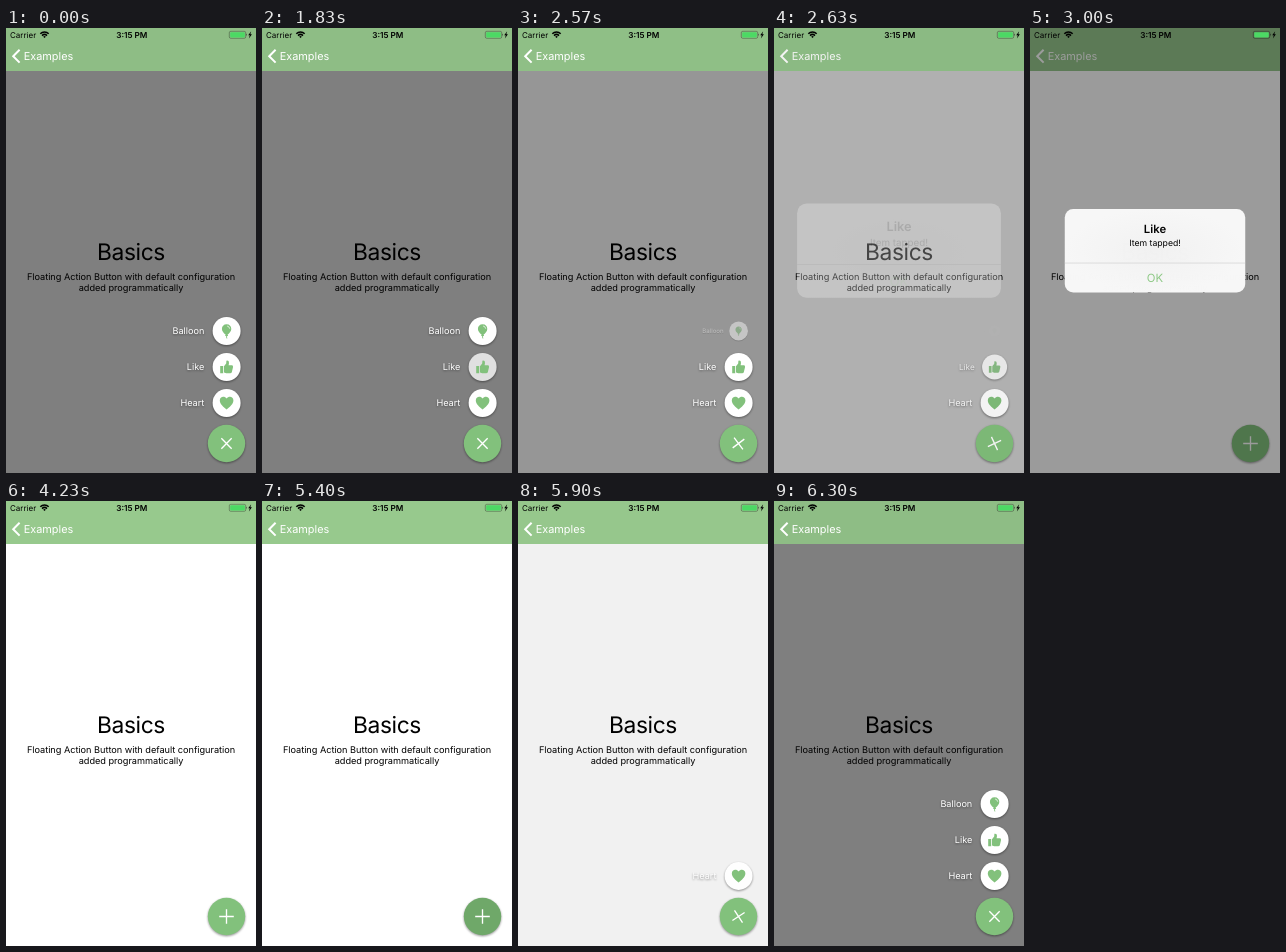
Write an HTML page that moves like this. It is 250x445 px and loops after 6330 ms.

```html
<!DOCTYPE html>
<html lang="en">
<head>
<meta charset="utf-8">
<title>Floating action button</title>
<style>
  html, body { margin: 0; width: 100%; height: 100%; overflow: hidden; background: #fff; }
  svg { display: block; width: 100%; height: 100%; }
  text { font-family: Inter, Roboto, sans-serif; text-rendering: geometricPrecision; }
  .middle { text-anchor: middle; }
  .raised { filter: drop-shadow(0 1px 1px rgba(0, 0, 0, .42)); }
  .label { font-size: 9.15px; fill: #fff; text-anchor: end; }
  .subtitle { font-size: 9.2px; letter-spacing: -.03px; }
  .icon { fill: #82c17c; }
</style>
</head>
<body>
<svg viewBox="0 0 250 445">
  <rect width="250" height="445" fill="#fff"/>
  <g class="middle">
    <text x="125" y="231.6" font-size="22.8" letter-spacing="-.4">Basics</text>
    <text class="subtitle" x="125" y="251.6">Floating Action Button with default configuration</text>
    <text class="subtitle" x="125" y="262.6">added programmatically</text>
  </g>
  <rect id="overlay" width="250" height="445"/>

  <rect width="250" height="43" fill="#97c98d"/>
  <rect id="navTint" width="250" height="43"/>
  <path d="M13.6 21.8 7.2 28.2l6.4 6.4" fill="none" stroke="#fff" stroke-width="2"/>
  <text x="17.7" y="32.2" font-size="10.9" fill="#fff">Examples</text>

  <g id="items"></g>
  <g class="raised" transform="translate(220.5 415.5)">
    <circle id="fab" r="18.7"/>
    <path id="plus" d="M-7.3 0H7.3M0-7.3V7.3" stroke="#fff" stroke-width="1.35"/>
  </g>

  <rect id="dim" width="250" height="445"/>
  <g id="alert" class="middle">
    <radialGradient id="frost">
      <stop offset="0" stop-color="#f3f3f3"/><stop offset="1" stop-color="#f9f9f9"/>
    </radialGradient>
    <g id="plate">
      <rect x="35" y="181" width="180" height="83.3" rx="8.5" fill="url(#frost)"/>
      <path id="okPress" d="M35 235H215V255.8a8.5 8.5 0 0 1-8.5 8.5H43.5a8.5 8.5 0 0 1-8.5-8.5Z" fill="#dedede"/>
      <rect x="35" y="234.7" width="180" height=".6" fill="#c9c9c9"/>
    </g>
    <g id="message">
      <text x="125" y="205.3" font-size="11.3" font-weight="600">Like</text>
      <text x="125" y="218.3" font-size="8.67">Item tapped!</text>
      <text x="125" y="253.8" font-size="11.33" fill="#8cc884">OK</text>
    </g>
  </g>

  <text x="4" y="9.8" font-size="8">Carrier</text>
  <g fill="none" stroke="#000" stroke-width="1.5">
    <path d="M34.3 5.7a6 6 0 0 1 8.4 0M36 7.6a3.6 3.6 0 0 1 5 0"/>
    <path d="M37.2 8.7a1.9 1.9 0 0 1 2.6 0L38.5 10Z" fill="#000" stroke="none"/>
  </g>
  <text class="middle" x="125.8" y="9.9" font-size="8.2" font-weight="600">3:15 PM</text>
  <rect x="223.3" y="3.3" width="16.4" height="7" rx="1.5" fill="none" stroke="#000" stroke-opacity=".5" stroke-width=".6"/>
  <rect x="224.2" y="4.2" width="14.6" height="5.2" rx=".8" fill="#4cd964"/>
  <path d="M240.4 5.6q1 1.2 0 2.4ZM245.2 3.2l-3 4h1.6l-.9 3.2 3-4.1h-1.6Z"/>
</svg>
<script>
const LOOP = 6330;
const CLOSE = { shown: 2570, start: 2491 };
const OPEN = { shown: 5870, start: 5840 };
const ALERT = { shown: 2590, gone: 3815, end: 4230 };

const ITEMS = [
  { name: 'Balloon', y: 303, icon: `<path d="M0-6.7C3-6.7 4.7-4.6 4.7-2 4.7.5 2.4 2.6 1 3.6L1.5 4.9H.5Q.2 6 .8 7.4H0Q-.7 6-.4 4.9H-1.5L-1 3.6C-2.4 2.6-4.7.5-4.7-2-4.7-4.6-3-6.7 0-6.7Z"/>
    <path d="M.5-5Q2.8-4.6 3.1-2.3" fill="none" stroke="#fff" stroke-width=".7"/>` },
  { name: 'Like', y: 339, icon: `<path d="M-6.4-1H-3.4V6.3H-6.4ZM-2.6-.8-.4-3.6-.2-6.3Q2.6-6.8 2.4-4L2-1.8H5.2Q6.9-1.6 6.4.2L5.2 5.2Q4.8 6.3 3.6 6.3H-.4L-2.6 5.5Z"/>` },
  { name: 'Heart', y: 375, icon: `<path d="M0 6.5C-3.2 3.7-6.8.9-6.8-2.6-6.8-6.6-2-7.4 0-4.4 2-7.4 6.8-6.6 6.8-2.6 6.8.9 3.2 3.7 0 6.5Z"/>` },
];

const byId = id => document.getElementById(id);
const set = (node, attrs) => {
  for (const key in attrs) node.setAttribute(key, attrs[key]);
};
const clamp = x => Math.min(1, Math.max(0, x));
const between = (t, from, to) => t >= from && t < to;
const ease = x => { x = clamp(x); return x * x * (3 - 2 * x); };

// Underdamped spring from 0 to 1 that settles after about `duration` ms.
function spring(t, duration, damping) {
  if (t <= 0) return 0;
  const decay = 6.9 / duration;
  const tangent = Math.sqrt(1 / damping ** 2 - 1);
  const phase = decay * tangent * t;
  return 1 - Math.exp(-decay * t) * (Math.cos(phase) + Math.sin(phase) / tangent);
}

// Critically damped curve used by the alert.
function settle(t) {
  const x = Math.max(0, t) * .0146;
  return 1 - (1 + x) * Math.exp(-x);
}

byId('items').innerHTML = ITEMS.map(({ name, icon }) => `<g class="raised">
  <circle r="14"/><g class="icon">${icon}</g><text class="label" x="-22.3" y="3.3">${name}</text></g>`).join('');
const itemNodes = [...byId('items').children];

// Each phase of the menu gives overlay, rotation and item progress, 1 being open.
function menuState(t) {
  if (between(t, CLOSE.shown, OPEN.shown)) {
    const dt = t - CLOSE.start;
    const open = 1 - ease(dt / 300);
    return { overlay: open, turn: open, item: i => 1 - ease((dt - i * 100) / 150) };
  }
  if (t >= OPEN.shown) {
    const dt = t - OPEN.start;
    return {
      overlay: ease(dt / 300),
      turn: spring(dt, 420, .55),
      item: i => spring(dt - (ITEMS.length - 1 - i) * 100, 300, .55),
    };
  }
  return { overlay: 1, turn: 1, item: () => 1 };
}

function draw(t) {
  const menu = menuState(t);
  set(byId('overlay'), { opacity: menu.overlay * .5 });
  set(byId('navTint'), { opacity: menu.overlay * .06 });
  set(byId('plus'), { transform: `rotate(${-45 * menu.turn})` });
  set(byId('fab'), { fill: between(t, 5400, OPEN.shown) ? '#6fa869' : '#82c17c' });

  const likePressed = between(t, 1830, 2070);
  itemNodes.forEach((node, i) => {
    const p = menu.item(i);
    set(node, { transform: `translate(220.6 ${ITEMS[i].y}) scale(${.4 + .6 * p})`, opacity: clamp(p) });
    set(node.querySelector('circle'), { fill: likePressed && i === 1 ? '#e0e0e0' : '#fff' });
  });

  const appear = settle(t - ALERT.shown);
  const alpha = t < ALERT.end ? clamp(appear - settle(t - ALERT.gone)) : 0;
  const scale = 1 + .15 * (1 - appear);
  set(byId('dim'), { opacity: .4 * alpha });
  set(byId('plate'), { opacity: alpha ** .6 });
  set(byId('message'), { opacity: alpha });
  set(byId('alert'), { transform: `translate(125 222.6) scale(${scale}) translate(-125 -222.6)` });
  set(byId('okPress'), { opacity: between(t, 3670, 3830) ? 1 : 0 });
}

const startTime = performance.now();
function tick() {
  draw((performance.now() - startTime) % LOOP);
  requestAnimationFrame(tick);
}
tick();
</script>
</body>
</html>
```
